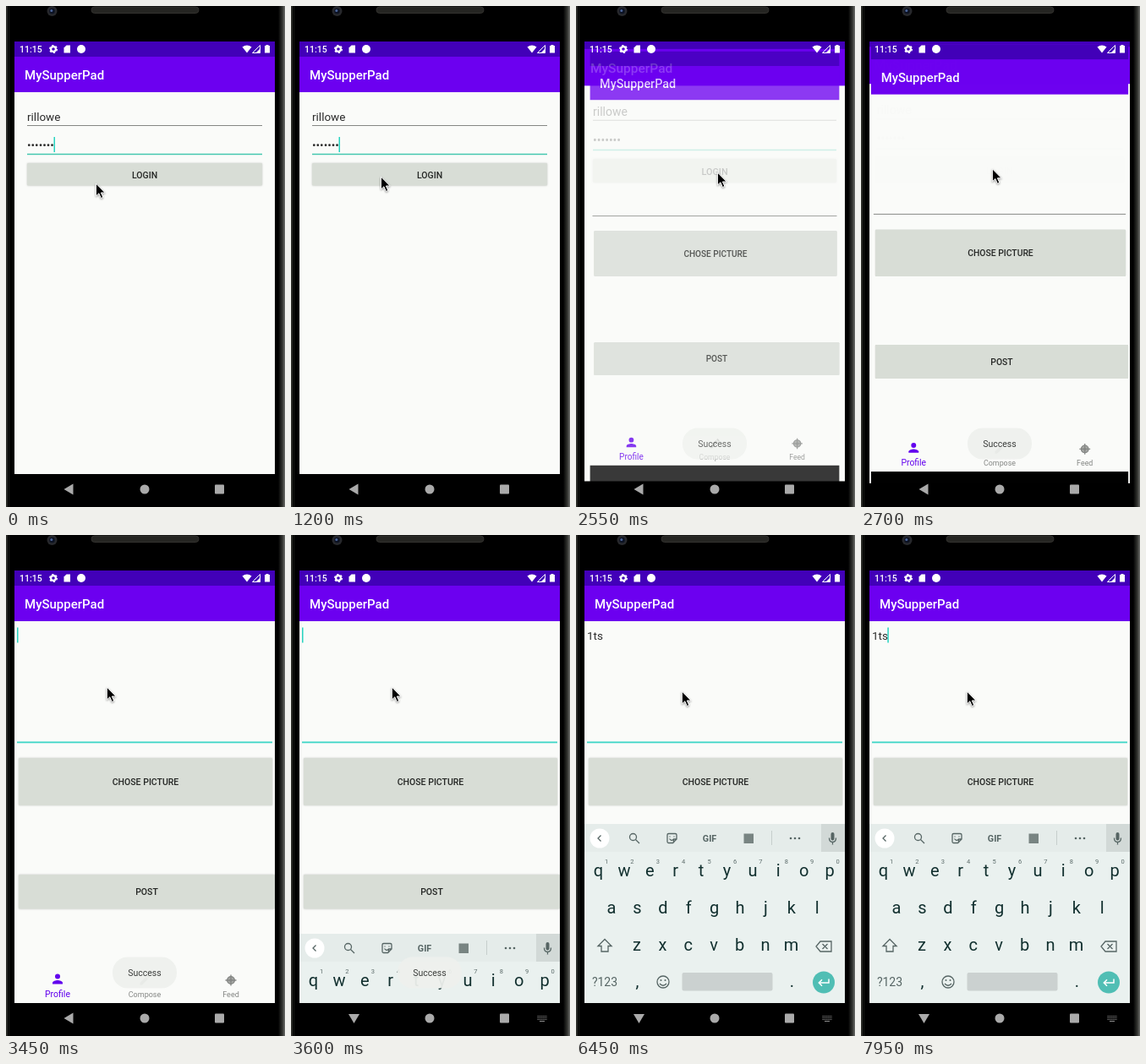
These frames come from a looping animation (330x593 px, 8 s). An HTML page:

```html
<!DOCTYPE html>
<html lang="en">
<head>
<meta charset="utf-8">
<title>Phone login and compose</title>
<style>
  html, body { margin: 0; width: 100%; height: 100%; overflow: hidden; background: #000; }
  svg { display: block; width: 100vw; height: 100vh; font-family: Roboto, sans-serif; }
  .mid { text-anchor: middle; }
  .title { font-size: 15px; font-weight: 500; fill: #fff; }
  .field { font-size: 13.5px; fill: #2b2b2b; }
  .caps { font-size: 10.5px; font-weight: 500; fill: #242624; text-anchor: middle; }
  .button { fill: #d8ddd6; filter: drop-shadow(0 .7px .8px #0003); }
  .caret { fill: #26d3c0; }
  .key { font-size: 20px; fill: #12302f; text-anchor: middle; }
  .hint { font-size: 7.5px; fill: #5c6b6a; text-anchor: middle; }
  .line { fill: none; stroke: #566564; stroke-width: 1.3; }
</style>
</head>
<body>
<svg viewBox="0 0 330 593" preserveAspectRatio="none">
  <defs>
    <clipPath id="display"><rect x="10" y="42" width="308" height="551"/></clipPath>
    <clipPath id="aboveNav"><rect x="10" y="42" width="308" height="512"/></clipPath>
    <linearGradient id="edge">
      <stop offset="0" stop-color="#000"/><stop offset=".6" stop-color="#32332f"/><stop offset="1" stop-color="#6c6d6a"/>
    </linearGradient>
    <g id="window">
      <rect x="10" y="100" width="308" height="455" fill="#fafbf9"/>
      <rect x="10" y="42" width="308" height="60" fill="#6c00f0"/>
      <rect x="10" y="42" width="308" height="18" fill="#4200b8"/>
      <rect x="10" y="554" width="308" height="39"/>
      <text class="title" x="22" y="87">MySupperPad</text>
    </g>
  </defs>

  <!-- phone body -->
  <rect width="330" height="593"/>
  <rect width="2" height="593" fill="#2b2c28"/>
  <rect x="3" width="1" height="593" fill="#161714"/>
  <rect x="322" width="8" height="593" fill="url(#edge)"/>
  <circle cx="54.500" cy="6" r="6" fill="#27282c"/>
  <circle cx="54.500" cy="6" r="3.300" fill="#0c1222"/>
  <circle cx="53.800" cy="5.500" r="1.500" fill="#4b6499"/>
  <rect x="101" y="1" width="127" height="7.500" rx="3.700" fill="#252522" stroke="#33322f"/>

  <g clip-path="url(#display)">
    <g id="login">
      <use href="#window"/>
      <text class="field" x="25" y="136">rillowe</text>
      <rect x="25" y="141" width="278" height="1" fill="#858784"/>
      <text class="field" x="25" y="169">•••••••</text>
      <rect x="25" y="174.700" width="278" height="1.500" fill="#45c7b0"/>
      <rect id="loginCaret" class="caret" x="56.500" y="155" width="1.500" height="18"/>
      <rect id="loginButton" class="button" x="25" y="186" width="278" height="26.500" rx="1"/>
      <text class="caps" x="164" y="203.700">LOGIN</text>
    </g>

    <g id="compose">
      <use href="#window"/>
      <text id="typed" class="field" x="13" y="123.700"></text>
      <rect id="composeCaret" class="caret" y="109.500" width="1.500" height="18"/>
      <rect id="underline" x="13" width="302"/>
      <rect class="button" x="15" y="264" width="300" height="56" rx="1"/>
      <text class="caps" x="165" y="296">CHOSE PICTURE</text>
      <rect class="button" x="15" y="402" width="303" height="40.500" rx="1"/>
      <text class="caps" x="166.500" y="426">POST</text>
      <g fill="#6200ee">
        <circle cx="61" cy="522.500" r="3"/>
        <path d="M55 531.500v-1.500c0-2 4-3 6-3s6 1 6 3v1.500z"/>
        <text class="mid" x="61" y="546.700" font-size="10.500">Profile</text>
      </g>
      <g fill="#858785">
        <path d="M158.500 532.500v-2.500l7-7 2.500 2.500-7 7zM166.300 522.200l1.300-1.300 2.500 2.500-1.300 1.300z"/>
        <text class="mid" x="164" y="546.700" font-size="9">Compose</text>
        <circle cx="266" cy="527" r="4.300" fill="#a6a8a5" stroke="#858785" stroke-width="1.400"/>
        <path d="M266 520.500v13M259.500 527h13" stroke="#858785" stroke-width="1.300"/>
        <circle cx="266" cy="527" r="1.700"/>
        <text class="mid" x="266" y="546.700" font-size="9">Feed</text>
      </g>
    </g>
  </g>

  <!-- status bar -->
  <g fill="#fff">
    <text x="16" y="54.800" font-size="10.500" font-weight="500">11:15</text>
    <circle cx="56" cy="51" r="2.900" fill="none" stroke="#fff" stroke-width="2.200"/>
    <circle cx="56" cy="51" r="4.400" fill="none" stroke="#fff" stroke-width="1.300" stroke-dasharray="2.300 2.300"/>
    <path d="M71.500 46.500h4.500v9h-7.500v-6z"/>
    <circle cx="89" cy="51" r="5"/>
    <path d="M279.500 48.500q5.500-4 11 0l-5.500 7z"/>
    <path d="M300.500 46.500v9h-9z" fill="none" stroke="#fff"/>
    <path d="M300.500 50.500v5h-5z"/>
    <path d="M307.500 46h3v1h1.500v8.500h-6v-8.500h1.500z"/>
  </g>

  <!-- navigation bar -->
  <g fill="#aaa">
    <path id="back" d="M-6 0L5-6.500V6.500z"/>
    <circle cx="164" cy="572" r="5.500"/>
    <rect x="247" y="566.500" width="11" height="11" rx="1"/>
    <g id="switcher" fill="none" stroke="#8c8c8c">
      <path d="M291.500 569.500h11M291.500 571.500h11M291.500 573.500h11" stroke-dasharray="1.200 .8"/>
      <path d="M294 575.500h6"/>
    </g>
  </g>

  <g clip-path="url(#aboveNav)">
    <g id="keyboard">
      <rect x="10" y="342" width="308" height="212" fill="#eaf1ef"/>
      <rect x="10" y="342" width="308" height="33" fill="#e5ecea"/>
      <rect x="290" y="342" width="28" height="33" fill="#d2d9d7"/>
      <circle cx="28" cy="359" r="11.500" fill="#fff"/>
      <g class="line">
        <path d="M29.500 355.500l-3.500 3.500 3.500 3.500"/>
        <circle cx="67.500" cy="357.500" r="4"/><path d="M70.500 360.500l4.500 4.500"/>
        <path d="M109.500 353.500h8q1.500 0 1.500 1.500v5l-4.500 4.500h-5q-1.500 0-1.500-1.500v-8q0-1.500 1.500-1.500zM119 360h-3.500v4.500M110.500 359.500q2 3 4.500 1M111 356.500v1M116 356.500v1"/>
        <path d="M231.500 350v17" stroke="#c6cecc" stroke-width="1"/>
        <path d="M299.500 358.500q0 5 4 5t4-5M303.500 363.500v3"/>
        <path d="M34 478.500l-8 8h4v6.500h8v-6.500h4z"/>
        <path d="M289 481h13v12h-13l-5-6zM291.500 484l6 6M297.500 484l-6 6"/>
        <circle cx="103" cy="529" r="7"/><path d="M99 531q4 4.500 8 0"/>
      </g>
      <g fill="#566564">
        <text class="mid" x="158" y="362.700" font-size="10.800" font-weight="700">GIF</text>
        <rect x="198.500" y="353.500" width="11.500" height="11.500" fill="#788482"/>
        <circle cx="254" cy="359" r="1.300"/><circle cx="259" cy="359" r="1.300"/><circle cx="264" cy="359" r="1.300"/>
        <rect x="301.500" y="352" width="4" height="9.500" rx="2"/>
        <circle cx="100.500" cy="527" r="1"/><circle cx="105.500" cy="527" r="1"/>
        <text class="mid" x="34" y="534" font-size="14">?123</text>
      </g>
      <text class="key" x="72.500" y="534.500" font-size="18">,</text>
      <text class="key" x="255.500" y="534.500" font-size="18">.</text>
      <rect x="125.500" y="518" width="107" height="21.500" rx="2" fill="#cbd1d0"/>
      <circle cx="293" cy="529.500" r="13" fill="#50beb4"/>
      <path d="M299 525.500v4.500h-11.500M291 526.300l-3.700 3.700 3.700 3.700" fill="none" stroke="#fff" stroke-width="1.500"/>
    </g>
  </g>

  <g id="toast">
    <rect x="126" y="499.500" width="76" height="37" rx="18" fill="#eef1ed" fill-opacity=".94"/>
    <text class="mid" x="164" y="521.800" font-size="10.500" fill="#3c3e3c">Success</text>
  </g>

  <path id="mouse" d="M0 0v15l3.500-3.200 2.500 5.700 2.500-1.100-2.500-5.400h4.800z" stroke="#fff" stroke-width="1"
        style="filter: drop-shadow(0 1px .8px #0006)"/>
</svg>

<script>
const LOOP = 8000, TICK = 150;
const el = Object.fromEntries([...document.querySelectorAll('svg [id]')].map(n => [n.id, n]));
const set = (node, attrs) => { for (const k in attrs) node.setAttribute(k, attrs[k]); };
const show = (node, on) => set(node, { visibility: on ? 'visible' : 'hidden' });
const within = (t, ...spans) => spans.some(([a, b]) => t >= a && t < b);

function addKey(label, x, y, className) {
  const text = document.createElementNS('http://www.w3.org/2000/svg', 'text');
  set(text, { class: className, x, y });
  text.textContent = label;
  el.keyboard.append(text);
}
[['qwertyuiop', 26.5, 404.2], ['asdfghjkl', 42, 448], ['zxcvbnm', 72, 492]].forEach(([row, x, y]) =>
  [...row].forEach((letter, i) => addKey(letter, x + 30.4 * i, y, 'key')));
[...'1234567890'].forEach((digit, i) => addKey(digit, 36 + 30.4 * i, 389, 'hint'));

// Each key: time, then values; linear between keys.
const mousePath = [[0, 106.4, 210], [450, 106.4, 210], [1200, 106.4, 202], [1350, 106.4, 202], [2100, 167.4, 197],
  [2550, 167.4, 197], [3150, 119.3, 180], [5400, 119.3, 180], [5550, 125.3, 185], [LOOP, 125.3, 185]];
const toastFade = [[0, 0], [2250, 0], [2400, .22], [2550, .75], [2700, 1], [4350, 1], [4800, 0], [LOOP, 0]];
const keyboardDrop = [[0, 212], [3450, 212], [3600, 130], [3750, 22], [3900, 0], [LOOP, 0]];

function sample(keys, t) {
  const i = keys.findIndex(k => k[0] > t);
  const a = keys[i - 1], b = keys[i], p = (t - a[0]) / (b[0] - a[0]);
  return a.slice(1).map((v, j) => v + (b[j + 1] - v) * p);
}
const zoom = s => `translate(164 316) scale(${s}) translate(-164 -316)`;

function draw(now) {
  const t = Math.floor(now % LOOP / TICK) * TICK;

  // The next screen grows and fades in over the enlarging login screen.
  const open = t < 2550 ? 0 : t >= 3150 ? 1 : 1 - Math.exp(-1.25 * ((t - 2550) / TICK + 1));
  set(el.login, { transform: zoom(1 + .05 * open) });
  set(el.compose, { transform: zoom(.85 + .15 * open), opacity: Math.min(1, open * 1.08) });
  show(el.login, open < 1);
  show(el.compose, open > 0);

  show(el.loginCaret, within(t, [0, 600], [1050, 1650], [2100, 2550]));
  el.loginButton.style.fill = within(t, [2100, 2400]) ? '#b1b6b0' : '';

  const typed = '1ts'.slice(0, t < 4800 ? 0 : t < 5850 ? 1 : t < 6000 ? 2 : 3);
  if (el.typed.textContent !== typed) el.typed.textContent = typed;
  set(el.composeCaret, { x: [13, 20.2, 24.7, 31.3][typed.length] });
  show(el.composeCaret, within(t, [2850, 3900], [4500, 5250], [5850, 6450], [6900, 7500], [7950, LOOP]));
  const focused = t >= 2850;
  set(el.underline, { y: focused ? 244.5 : 245, height: focused ? 1.8 : 1, fill: focused ? '#3dd5c6' : '#858784' });

  const keyboardUp = t >= 3600;
  set(el.keyboard, { transform: `translate(0 ${sample(keyboardDrop, t)[0]})` });
  show(el.keyboard, keyboardUp);
  show(el.switcher, keyboardUp);
  set(el.back, { transform: `translate(74.500 572) rotate(${keyboardUp ? -90 : 0})` });

  set(el.toast, { opacity: sample(toastFade, t)[0] });
  set(el.mouse, { transform: `translate(${sample(mousePath, t)})` });
}

const start = performance.now();
(function frame() {
  draw(performance.now() - start);
  requestAnimationFrame(frame);
})();
</script>
</body>
</html>
```
